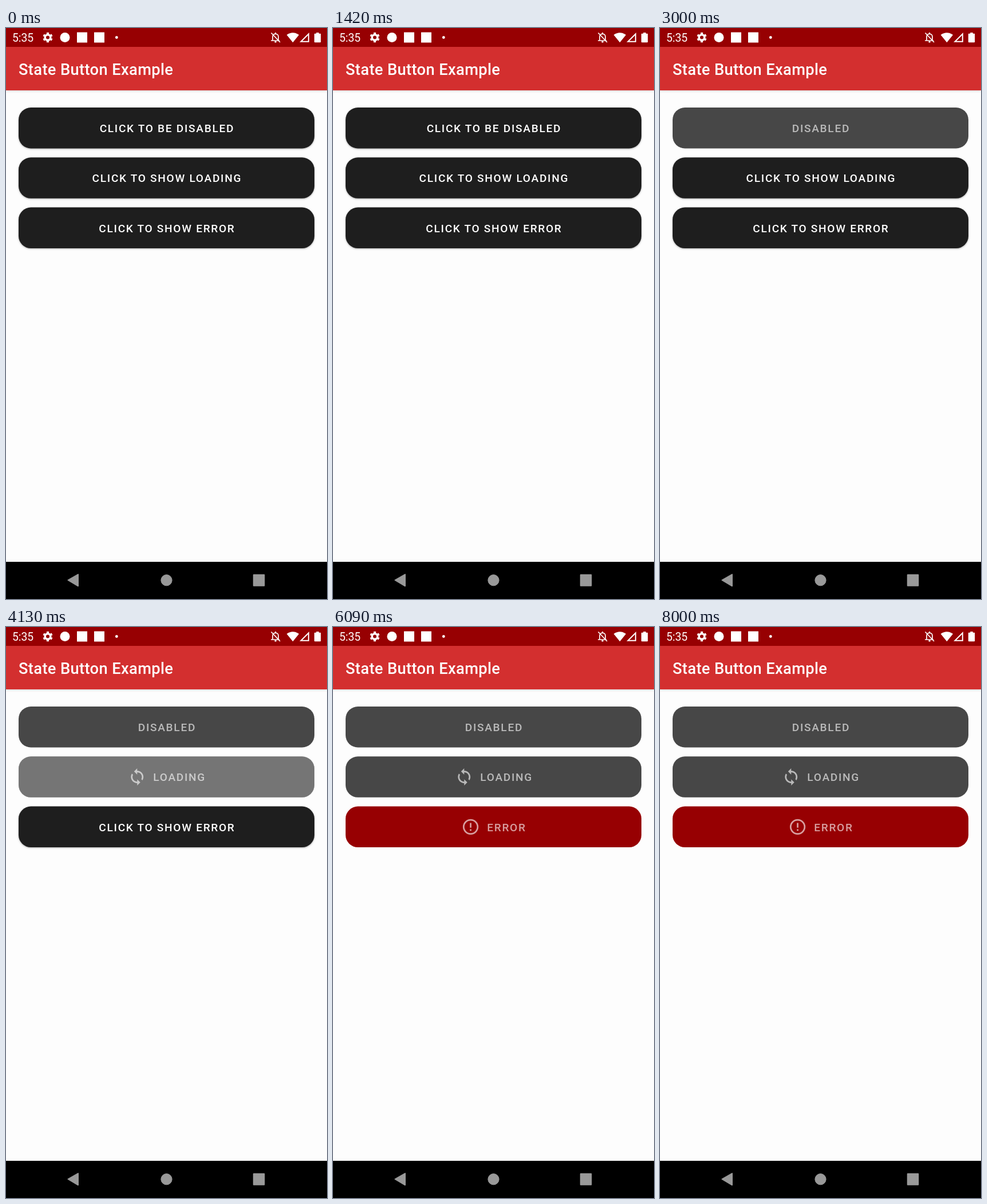
Recreate the animation shown at these times as an HTML page. Size 561 by 998 pixels, loop 8040 ms.

```html
<!DOCTYPE html>
<html lang="en">
<head>
<meta charset="utf-8">
<title>State Button Example</title>
<style>
  html, body { margin: 0; width: 100%; height: 100%; overflow: hidden; background: #fdfdfd; }
  svg { display: block; width: 561px; height: 998px; font-family: Roboto, sans-serif; }
  .label { font-size: 19.1px; font-weight: 500; letter-spacing: 1.7px; text-anchor: middle; }
  .shade { filter: drop-shadow(0 1.5px 1.8px rgba(0, 0, 0, .32)); }
  .bar { filter: drop-shadow(0 1.5px 2px rgba(0, 0, 0, .16)); }
</style>
</head>
<body>
<svg viewBox="0 0 561 998">
  <defs>
    <clipPath id="pill"><rect x="22" y="139" width="517" height="71.5" rx="21.5"/></clipPath>
    <path id="sync" d="M12 4V1L8 5l4 4V6c3.31 0 6 2.69 6 6 0 1.01-.25 1.97-.7 2.8l1.46 1.46C19.54 15.03 20 13.57 20 12c0-4.42-3.58-8-8-8zm0 14c-3.31 0-6-2.69-6-6 0-1.01.25-1.97.7-2.8L5.24 7.74C4.46 8.97 4 10.43 4 12c0 4.42 3.58 8 8 8v3l4-4-4-4v3z"/>
    <g id="alert">
      <circle cx="12" cy="12" r="9" fill="none" stroke="#fff" stroke-width="2"/>
      <path d="M11 7h2v6h-2zM11 15h2v2h-2z"/>
    </g>
  </defs>
  <rect width="561" height="998" fill="#fdfdfd"/>
  <rect class="bar" width="561" height="109" fill="#d32f2f"/>
  <rect width="561" height="33" fill="#970002"/>

  <!-- status bar -->
  <g fill="#fff">
    <text x="11" y="24" font-size="19.3">5:35</text>
    <g fill="none" stroke="#fff">
      <circle cx="73" cy="16.5" r="4.8" stroke-width="3.6"/>
      <circle cx="73" cy="16.5" r="7.2" stroke-width="3" pathLength="12" stroke-dasharray="1" stroke-dashoffset=".5" transform="rotate(30 73 16.5)"/>
    </g>
    <circle cx="103" cy="16.5" r="8.5"/>
    <rect x="124" y="7.5" width="18" height="18"/>
    <rect x="154" y="7.5" width="18" height="18"/>
    <circle cx="193.3" cy="16.5" r="2.4"/>
    <g fill="none" stroke="#fff" stroke-width="1.7">
      <path d="M463 22H478M466 22V15.5Q466 10.5 471 10.5T476 15.5V22M463.5 8.5L479 25"/>
      <path d="M471 8V11M469.5 24.2H472.5" stroke-width="2.4"/>
    </g>
    <path d="M501.3 25.3L490.6 12Q501.3 4.5 512 12Z"/>
    <path d="M528.8 10.5V23.8H515.5Z" fill="none" stroke="#fff" stroke-width="2"/>
    <path d="M542.3 8h4.4v1.8h2.3q1.2 0 1.2 1.2v13q0 1.2-1.2 1.2h-9q-1.2 0-1.2-1.2v-13q0-1.2 1.2-1.2h2.3z"/>
    <text x="22" y="81.5" font-size="27.3" font-weight="500" letter-spacing=".35">State Button Example</text>
  </g>

  <g id="buttons"></g>

  <!-- navigation bar -->
  <rect y="933" width="561" height="65" fill="#000"/>
  <g fill="#999" stroke="#999" stroke-linejoin="round">
    <path d="M108.5 965L126 955V975.3Z" stroke-width="2"/>
    <circle cx="280.5" cy="965.2" r="9.6"/>
    <rect x="433" y="956" width="18" height="18.5" stroke-width="2.5"/>
  </g>
</svg>
<script>
const LOOP = 8040, ENTER = 225, FADE = 150, RELEASE = 100;

const buttons = [
  { press: 2342, touch: [295, 170], idle: 'CLICK TO BE DISABLED', done: 'DISABLED', x: 281.4, fill: '#474747' },
  { press: 3945, touch: [290, 175], idle: 'CLICK TO SHOW LOADING', done: 'LOADING', x: 303.2, fill: '#474747', icon: 'sync', iconX: 229.3 },
  { press: 5560, touch: [290, 175], idle: 'CLICK TO SHOW ERROR', done: 'ERROR', x: 303.4, fill: '#970002', icon: 'alert', iconX: 240.6 }
];

const clamp = v => Math.max(0, Math.min(1, v));
const mix = (a, b, p) => a + (b - a) * p;

// cubic-bezier(.4, 0, .2, 1)
function ease(x) {
  let lo = 0, hi = 1;
  for (let i = 0; i < 20; i++) {
    const s = (lo + hi) / 2, q = 1 - s;
    if (1.2 * s * q * q + .6 * s * s * q + s ** 3 < x) lo = s; else hi = s;
  }
  return lo * lo * (3 - 2 * lo);
}

const group = document.getElementById('buttons');
buttons.forEach((b, i) => {
  const g = document.createElementNS('http://www.w3.org/2000/svg', 'g');
  g.setAttribute('transform', `translate(0 ${i * 87.3})`);
  g.innerHTML = `
    <rect x="22" y="139" width="517" height="71.5" rx="21.5"/>
    <g clip-path="url(#pill)"><circle fill="#fff"/></g>
    <g fill="#fff">
      <text class="label" y="182"></text>
      ${b.icon ? `<use href="#${b.icon}" transform="translate(${b.iconX - 16.4} 158.4) scale(1.364)"/>` : ''}
    </g>`;
  group.append(g);
  b.box = g.querySelector('rect');
  b.ripple = g.querySelector('circle');
  b.text = g.querySelector('text');
  b.content = b.text.parentNode;
  b.mark = g.querySelector('use');
});

function drawButton(b, t) {
  const age = t - b.press, done = age >= RELEASE;
  b.box.setAttribute('fill', done ? b.fill : '#1e1e1e');
  b.box.setAttribute('class', done ? '' : 'shade');
  b.text.textContent = done ? b.done : b.idle;
  b.text.setAttribute('x', done ? b.x : 281.4);
  b.content.setAttribute('opacity', done ? .62 : 1);
  if (b.mark) b.mark.setAttribute('visibility', done ? 'visible' : 'hidden');

  const p = ease(clamp(age / ENTER));
  const alpha = clamp(age / 75) * (1 - clamp((age - ENTER) / FADE));
  b.ripple.setAttribute('cx', mix(b.touch[0], 280.5, p));
  b.ripple.setAttribute('cy', mix(b.touch[1], 174.7, p));
  b.ripple.setAttribute('r', mix(155, 262, p));
  b.ripple.setAttribute('opacity', .25 * alpha);
}

const start = performance.now();
function frame() {
  const t = (performance.now() - start) % LOOP;
  buttons.forEach(b => drawButton(b, t));
  requestAnimationFrame(frame);
}
frame();
</script>
</body>
</html>
```
